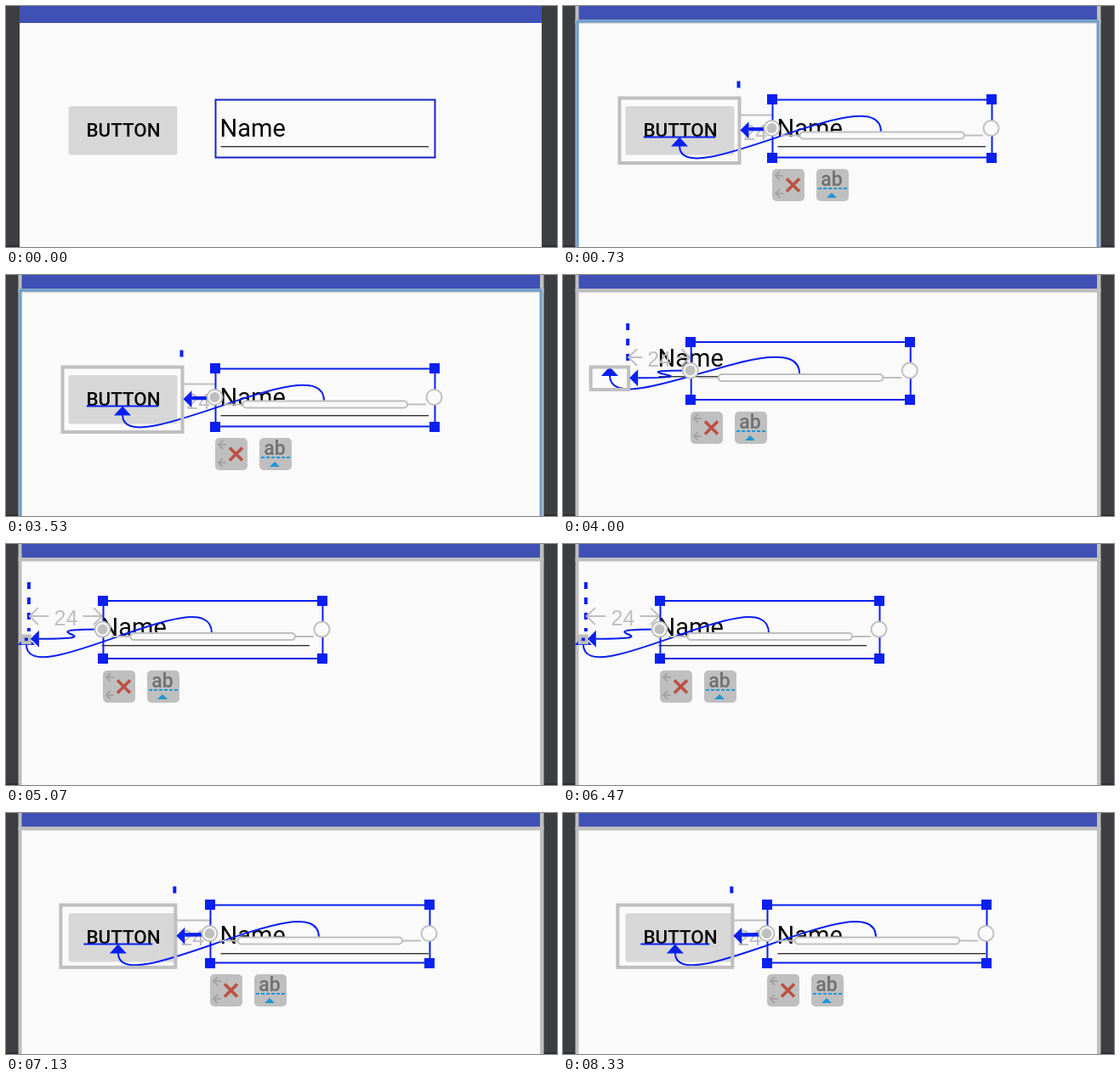
These frames come from a looping animation (648x284 px, 8390 ms). An HTML page with a canvas:

```html
<!DOCTYPE html>
<html lang="en">
<head>
<meta charset="utf-8">
<style>
html, body { margin: 0; width: 100%; height: 100%; overflow: hidden; background: #3c3e42; }
canvas { display: block; }
</style>
</head>
<body>
<canvas id="stage" width="648" height="284"></canvas>
<script>
const ctx = document.getElementById('stage').getContext('2d');
const LOOP = 8390, FPS = 15;
const SELECT = 400, UNHOVER = 3590, HIDE = 3783, SHOW = 6647, MOVE = 350;
const BLUE = '#0a20f0', GREY = '#bfbfbf', PAPER = '#fafafa';

const ease = p => 0.5 - 0.5 * Math.cos(Math.PI * Math.min(1, Math.max(0, p)));

function rect(x, y, w, h, color) {
  ctx.fillStyle = color;
  ctx.fillRect(x, y, w, h);
}

function rounded(x, y, w, h, r, color) {
  ctx.beginPath();
  ctx.roundRect(x, y, w, h, r);
  ctx.fillStyle = color;
  ctx.fill();
}

function text(str, x, y, font, color, align = 'left') {
  ctx.font = font;
  ctx.fillStyle = color;
  ctx.textAlign = align;
  ctx.fillText(str, x, y);
}

function stroke(path, color, width, dash = []) {
  ctx.strokeStyle = color;
  ctx.lineWidth = width;
  ctx.setLineDash(dash);
  ctx.stroke(new Path2D(path));
  ctx.setLineDash([]);
}

function fill(path, color) {
  ctx.fillStyle = color;
  ctx.fill(new Path2D(path));
}

function circle(x, y, r, color, outline) {
  ctx.beginPath();
  ctx.arc(x, y, r, 0, 7);
  ctx.fillStyle = color;
  ctx.fill();
  if (outline) {
    ctx.strokeStyle = outline;
    ctx.lineWidth = 2;
    ctx.stroke();
  }
}

function drawPage(selected, hovered) {
  rect(0, 0, 648, 284, '#3c3e42');
  rect(0, 282, 648, 2, '#2d2e32');
  rect(16, 0, 614, 284, PAPER);
  rect(16, 0, 614, 20, '#3f51b5');
  if (!selected) return;
  rect(14.5, 0, 4, 284, GREY);
  rect(628, 0, 4.5, 284, GREY);
  rect(14.5, 16, 618, 4.5, GREY);
  if (hovered) stroke('M17 284V18H629V284', '#6c9fd0', 3);
}

function drawWidgets(gone) {
  if (!gone) {
    rounded(73.5, 118, 128, 57.5, 3, '#d7d7d7');
    text('BUTTON', 138, 154, '500 22.4px Roboto, sans-serif', '#0a0a0a', 'center');
  }
  const x = gone ? 112.5 : 252.5, y = gone ? 108 : 154;
  text('Name', x - 1, y, '29px Roboto, sans-serif', '#0a0a0a');
  rect(x, y + 11, 244.5, 1.4, '#333');
}

function drawMargin(edge, x, y) {
  const mid = (edge + x) / 2, wide = x - edge > 60;
  stroke(`M${edge} ${y - 40}V103`, BLUE, 4, [8, 10]);
  if (wide) {
    stroke(`M${mid - 20} ${y}H${edge + 1}m10 -10l-10 10l10 10
            M${mid + 20} ${y}H${x - 1}m-10 -10l10 10l-10 10`, GREY, 2);
  } else {
    stroke(`M${edge} ${y}H${x}`, GREY, 2);
  }
  text('24', mid, y + (wide ? 11 : 29), '25px "Liberation Sans", sans-serif', GREY, 'center');
}

function drawTools(x, y) {
  rounded(x, y, 38, 38, 5, GREY);
  for (const ay of [8, 29])
    stroke(`M${x + 13} ${y + ay}h-9m5 -5l-5 5l5 5`, '#a3a3a3', 2);
  stroke(`M${x + 17} ${y + 11.5}l15 15m0 -15l-15 15`, '#bb5142', 3.6);
  rounded(x + 52, y, 38, 38, 5, GREY);
  text('ab', x + 70, y + 19.5, '500 23px Roboto, sans-serif', '#707070', 'center');
  stroke(`M${x + 54} ${y + 23}h34`, '#2196d3', 2, [4, 2]);
  fill(`M${x + 64} ${y + 34}l6 -6l6 6z`, '#2196d3');
}

// k: 1 = button visible, 0 = button collapsed to a point
function drawSelection(k, gone) {
  const x = 106 + 140 * k, y = 64 + 46 * k;
  const left = 17 + 49.5 * k, right = 17 + 190.5 * k;
  const top = 108.5, bottom = 112 + 73 * k;
  const mid = (left + right) / 2, anchorY = y + 34;
  const baseline = gone ? 108 : 154.5, pillY = y + 42.5;

  drawMargin(right - 1, x, y + 18.5);

  // Baseline link
  const half = (right - left) * 0.3, sx = x + 128, ex = mid, ey = baseline + 10;
  stroke(`M${mid - half} ${baseline}h${2 * half}`, BLUE, 2);
  fill(`M${mid - 10} ${baseline + 11}l10 -11l10 11z`, BLUE);
  stroke(`M${sx} ${pillY - 4}C${sx} ${pillY - 72} ${ex} ${ey + 60} ${ex} ${ey}`, BLUE, 2);
  ctx.strokeStyle = GREY;
  ctx.lineWidth = 4;
  ctx.strokeRect(left, top, right - left, bottom - top);

  // Side link
  const tipY = (top + bottom) / 2 - 0.5, tip = right + 1;
  stroke(`M${x} ${anchorY}C${x - 100} ${anchorY} ${tip + 110} ${tipY} ${tip + 10} ${tipY}`, BLUE, 2);
  fill(`M${tip} ${tipY}l10 -10v20z`, BLUE);

  // Frame, baseline pill, handles and anchors
  stroke(`M${x + 0.5} ${y + 0.5}h258v68h-258z`, BLUE, 2);
  stroke(`M${x + 10} ${pillY}h238`, GREY, 2);
  rounded(x + 31.5, pillY - 5, 195.5, 10, 5, GREY);
  rounded(x + 33.5, pillY - 3, 191.5, 6, 3, PAPER);
  for (const hx of [x, x + 258])
    for (const hy of [y, y + 68.5])
      rect(Math.round(hx - 6), Math.round(hy - 6), 12, 12, BLUE);
  circle(x - 0.5, anchorY, 9, PAPER, GREY);
  circle(x - 0.5, anchorY, 6, GREY);
  circle(x + 257.5, anchorY, 9, PAPER, GREY);

  drawTools(Math.round(x), Math.round(y + 82));
}

function draw(now) {
  const t = Math.floor((now % LOOP) * FPS / 1000 + 0.1) * 1000 / FPS;
  const selected = t >= SELECT - 1;
  const gone = t >= HIDE && t < SHOW;
  const k = t < SHOW
    ? 1 - Math.min(0.943, ease((t - HIDE) / MOVE))
    : Math.min(0.957, Math.max(0.057, ease((t - SHOW) / MOVE)));

  drawPage(selected, t < UNHOVER);
  drawWidgets(gone);
  if (selected) drawSelection(k, gone);
  else stroke('M246.5 110.5h258v68h-258z', '#1822c8', 2);
  requestAnimationFrame(draw);
}
requestAnimationFrame(draw);
</script>
</body>
</html>
```
